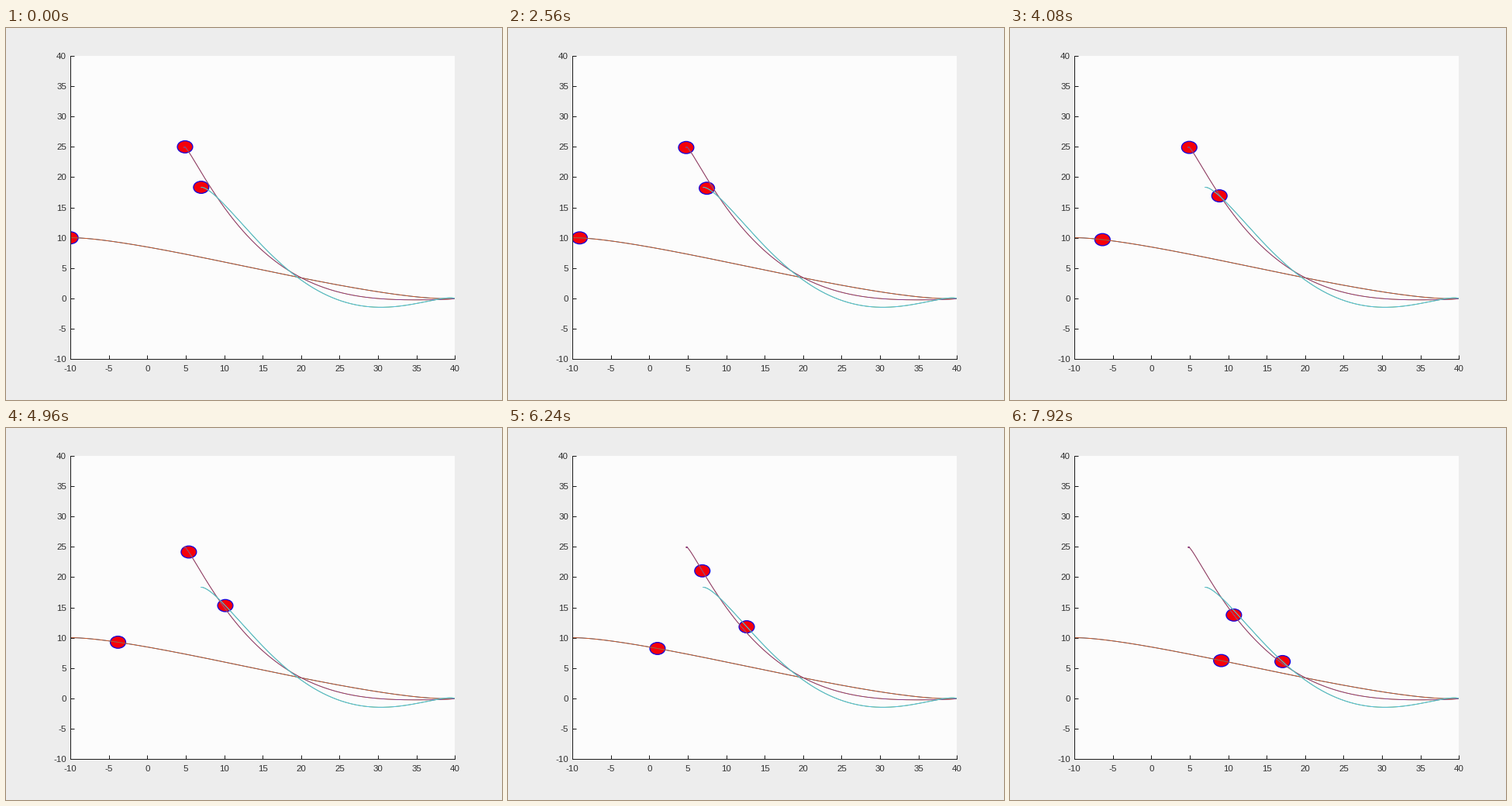
A matplotlib script for the animation above (8 s loop, 640x480 px).

```python
import numpy as np
import matplotlib.pyplot as plt
from matplotlib.animation import FuncAnimation
from matplotlib.patches import Circle

FRAMES, INTERVAL = 100, 80
HOLD, TRIP = 3, 220  # frames at rest, frames for a whole trip
PX = 0.72            # one pixel in points at 100 dpi

plt.rcParams["font.family"] = "Liberation Sans"
plt.rcParams["axes.unicode_minus"] = False

fig = plt.figure(figsize=(6.4, 4.8), dpi=100, facecolor="#ededed")
ax = fig.add_axes([0.13, 0.11, 0.775, 0.815], facecolor="#fcfcfc")
ax.set(xlim=(-10, 40), ylim=(-10, 40),
       xticks=range(-10, 41, 5), yticks=range(-10, 41, 5))
ax.spines[["top", "right"]].set_visible(False)
ax.spines[["left", "bottom"]].set(color="#1c1c1c", linewidth=PX)
ax.tick_params(direction="in", length=5 * PX, width=PX, color="#1c1c1c",
               labelcolor="#303030", labelsize=11.5 * PX)
ax.tick_params(axis="x", pad=7.7 * PX)
ax.tick_params(axis="y", pad=5 * PX)


def travel(u, start, end, bend):
    """Minimum-jerk move, bent in between by a polynomial that leaves the ends at rest."""
    ease = u**3 * (10 - 15 * u + 6 * u**2)
    nodes = np.linspace(0.2, 0.8, len(bend))
    sway = np.polyval(np.polyfit(nodes, bend, len(bend) - 1), u)
    return start + (end - start) * (ease + (u * (1 - u))**3 * sway)


class Robot:
    def __init__(self, start, bend_x, bend_y, colors):
        self.start, self.bends = start, (bend_x, bend_y)
        path = self.position(np.linspace(0, 1, 400))
        for color in colors:
            ax.plot(*path, color=color, lw=0.65, zorder=2.4)
        self.ball = ax.add_patch(Circle(start, 1, fc="#f5000a", ec="#1400dc",
                                        lw=1.3 * PX, zorder=2.2))

    def position(self, u):
        return [travel(u, start, end, bend)
                for start, end, bend in zip(self.start, (40, 0), self.bends)]


robots = [
    Robot((-10, 10), [0, 0], [-9.3, 13.2], ("#0072bd", "#d95319")),
    Robot((4.9, 25), [-14.5, -14.5], [-14, -4.6, 10.4, 17.3, 16.4],
          ("#edb120", "#7e2f8e")),
    Robot((7, 18.33), [-3.2, -8.2], [-0.8, 12.6, 23.1, 26.6, 18.5],
          ("#77ac30", "#4dbeee")),
]


def update(frame):
    u = max(0, frame - HOLD) / TRIP
    for robot in robots:
        robot.ball.center = robot.position(u)
    return [robot.ball for robot in robots]


anim = FuncAnimation(fig, update, frames=FRAMES, interval=INTERVAL,
                     repeat=True, repeat_delay=0)
plt.show()
```
